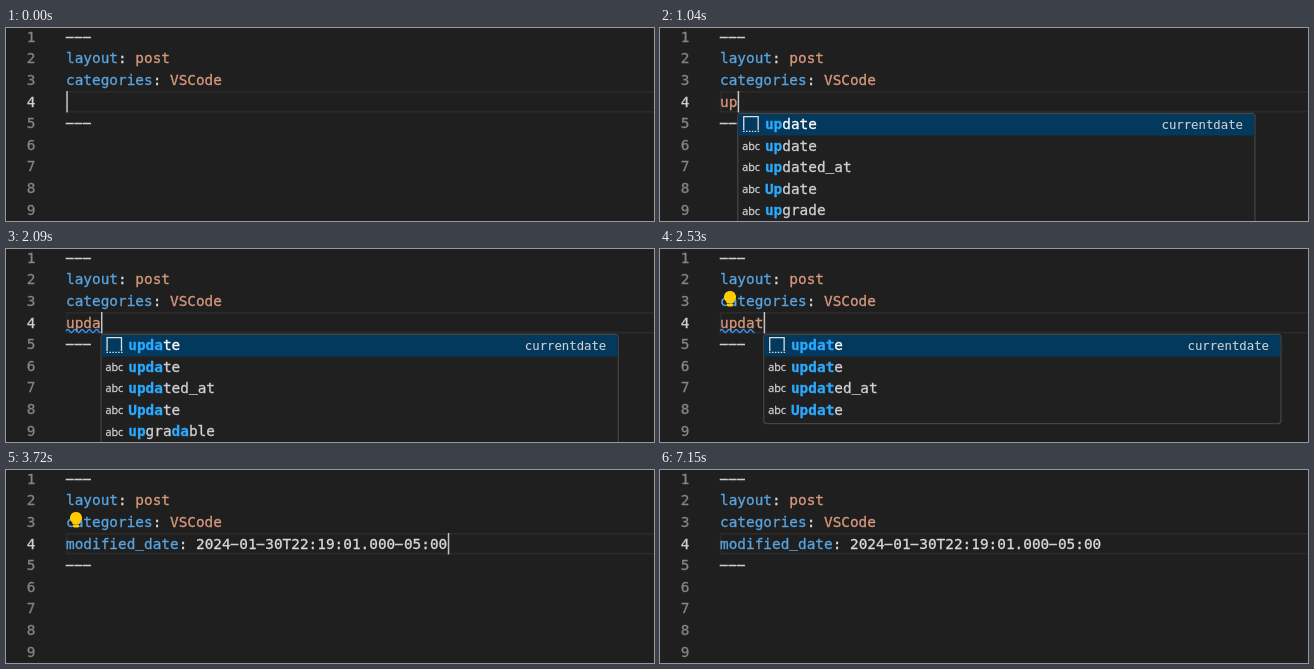
These frames come from a looping animation (648x193 px, 7170 ms). An HTML page:

```html
<!DOCTYPE html>
<html lang="en">
<head>
<meta charset="utf-8">
<title>Snippet completion</title>
<style>
html, body { margin: 0; width: 100%; height: 100%; overflow: hidden; background: #1f1f1f; }
svg { display: block; width: 648px; height: 193px; }
text {
  font: 14.4px "DejaVu Sans Mono", monospace; white-space: pre;
  color: #d0d0d0; fill: currentColor; stroke: currentColor; stroke-width: .3px;
}
tspan { fill: currentColor; stroke: currentColor; }
.num { color: #858585; text-anchor: end; }
.now { color: #d0d0d0; }
.key { color: #58a4e0; }
.str { color: #d8987c; }
.val { color: #dadada; }
.dash { font-size: 12.4px; letter-spacing: 1.2px; baseline-shift: .6px; stroke-width: .5px; }
.low { baseline-shift: 1.8px; }
.hit { color: #2aaaff; font-weight: bold; }
.picked { color: #fff; }
.detail { font-size: 12.3px; text-anchor: end; stroke-width: .1px; }
.abc { font: 10.8px "Open Sans", sans-serif; }
</style>
</head>
<body>
<svg viewBox="0 0 648 193">
  <rect width="648" height="193" fill="#1f1f1f"/>
  <rect x="60.6" y="63.9" width="600" height="19.8" fill="none" stroke="#2a2a2a" stroke-width="1.8"/>
  <g id="page"></g>
  <g id="typed"></g>
  <path id="squiggle" fill="none" stroke="#3794ff" stroke-width="1.3"/>
  <g id="bulb" fill="#fc0">
    <path d="M70 42a6 6 0 0 1 3.6 10.8V54H66.4V52.8A6 6 0 0 1 70 42Z"/>
    <path d="M67 54.6h6v1.6a1.4 1.4 0 0 1-1.4 1.4h-3.2a1.4 1.4 0 0 1-1.4-1.4Z"/>
  </g>
  <rect id="cursor" y="63" width="1.5" height="21.4" fill="#c4c4c4"/>
  <g id="popup"></g>
</svg>
<script>
const LOOP = 7170, LEFT = 60, ADVANCE = 8.67, ROW = 21.6;
const $ = id => document.getElementById(id);
const baseline = row => 13.85 + (row - 1) * ROW;

// Wider hyphens and higher underscores than the font provides
const glyphs = s => s
  .replace(/-/g, '<tspan class="dash">–</tspan>')
  .replace(/_/g, '<tspan class="low">_</tspan>');
const span = (cls, s) => `<tspan class="${cls}">${glyphs(s)}</tspan>`;
const text = (x, y, body, cls = '') => `<text x="${x}" y="${y}" class="${cls}">${body}</text>`;
const pair = (key, value, cls) => span('key', key) + span('val', ': ') + span(cls, value);

const stamp = '2024-01-30T22:19:01.000-05:00';
const finalLine = pair('modified_date', stamp, 'val');
const finalLength = 'modified_date: '.length + stamp.length;

const common = ['update', 'update', 'updated_at', 'Update'];
// Each edit: start time, typed text, suggestions
const edits = [
  [0, '', []],
  [600, 'u', ['update', 'ubuntu', 'ui', 'uncheck', 'under']],
  [1040, 'up', [...common, 'upgrade']],
  [1640, 'upd', [...common, 'upgrade']],
  [2090, 'upda', [...common, 'upgradable']],
  [2530, 'updat', common],
  [3720, null, []]
];
const cursorFlips = [450, 600, 1490, 1640, 3130, 3570, 4170, 4620, 5210, 5660, 6100, 6700, 7150];

function highlight(word, typed) {
  let matched = 0;
  return [...word].map(c => {
    const hit = c.toLowerCase() === typed[matched];
    if (hit) matched++;
    return hit ? span('hit', c) : glyphs(c);
  }).join('');
}

function suggestions(typed, words) {
  if (!words.length) return '';
  const x = LEFT + typed.length * ADVANCE - 0.2, width = 518.4;
  const height = words.length * ROW + 2.8;
  let out = `<rect x="${x + .6}" y="85.4" width="${width - 1.2}" height="${height}" rx="3" fill="#202020" stroke="#454545" stroke-width="1.2"/>
    <rect x="${x + 1.2}" y="86" width="${width - 2.4}" height="21.4" rx="1" fill="#04395e"/>
    <path d="M${x + 6.6} 102V88.6h14.4V102" fill="none" stroke="#ddd" stroke-width="1.3"/>
    <path d="M${x + 6} 103.4h16" stroke="#ddd" stroke-width="1.4" stroke-dasharray="1.5 1.4"/>`;
  words.forEach((word, i) => {
    const y = 101.05 + i * ROW;
    if (i) out += text(x + 5, y - .8, 'abc', 'abc');
    out += text(x + 27.8, y, highlight(word, typed), i ? '' : 'picked');
  });
  out += text(x + width - 12.6, 100.8, 'currentdate', 'detail');
  if (typed === 'u')
    out += `<rect x="${x + width - 13.2}" y="86" width="12" height="77" fill="#797979" fill-opacity=".55"/>`;
  return out;
}

function wave(length) {
  let d = `M${LEFT} 82`;
  for (let x = 0; x < length; x += .5)
    d += `L${LEFT + x} ${(82 - 1.5 * Math.sin(x * 2 * Math.PI / 7.2)).toFixed(2)}`;
  return d;
}

function drawPage() {
  let out = '';
  for (let n = 1; n <= 9; n++) out += text(29.3, baseline(n), n, n === 4 ? 'num now' : 'num');
  out += text(LEFT, baseline(1), span('val', '---')) + text(LEFT, baseline(5), span('val', '---'));
  out += text(LEFT, baseline(2), pair('layout', 'post', 'str'));
  out += text(LEFT, baseline(3), pair('categories', 'VSCode', 'str'));
  $('page').innerHTML = out;
}

let shown;
function showEdit(edit) {
  if (edit === shown) return;
  shown = edit;
  const [, typed, words] = edit;
  const done = typed === null;
  $('typed').innerHTML = text(LEFT, baseline(4), done ? finalLine : span('str', typed));
  $('popup').innerHTML = suggestions(typed, words);
  $('cursor').setAttribute('x', LEFT + .3 + (done ? finalLength : typed.length) * ADVANCE);
}

const show = (id, on) => $(id).setAttribute('visibility', on ? 'visible' : 'hidden');

function frame() {
  const t = performance.now() % LOOP;
  showEdit(edits.findLast(e => e[0] <= t));
  show('cursor', cursorFlips.filter(f => f <= t).length % 2 === 0);
  show('bulb', t >= 2390 && t < 4020);
  show('squiggle', t >= 2090 && t < 3720);
  $('squiggle').setAttribute('d', wave((t < 2680 ? 4 : 5) * ADVANCE));
  requestAnimationFrame(frame);
}

drawPage();
frame();
</script>
</body>
</html>
```
